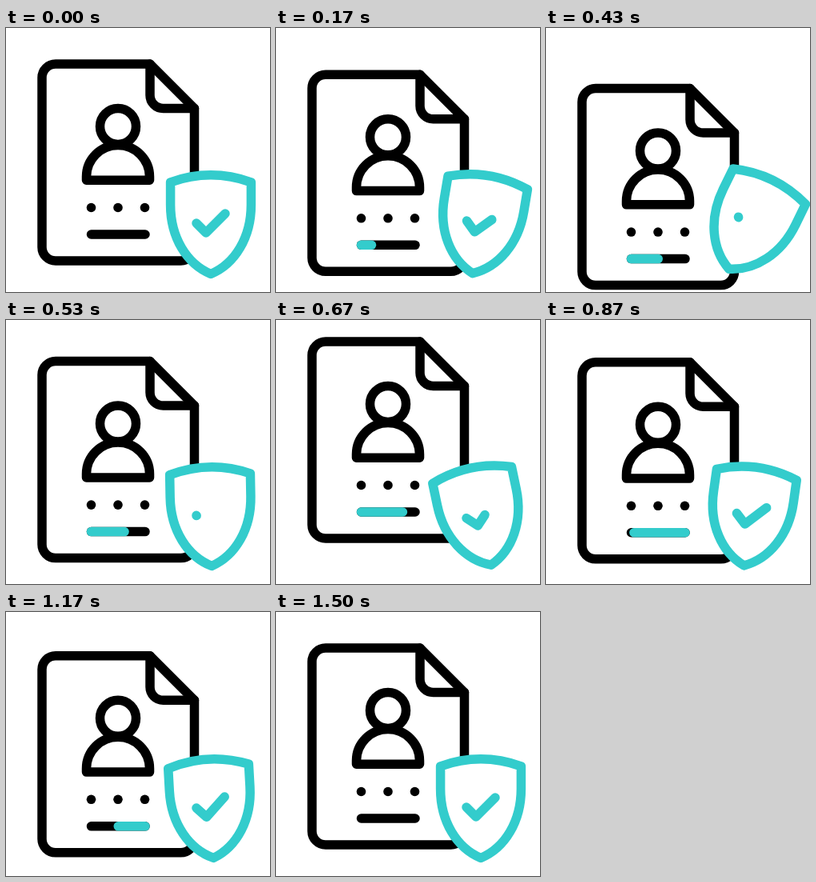
An HTML page with a canvas that plays this animation: 330x330 px, repeating every 1670 ms.

```html
<!DOCTYPE html>
<html lang="en">
<head>
<meta charset="utf-8">
<title>Verified profile</title>
<style>
  html, body { margin: 0; width: 100%; height: 100%; overflow: hidden; background: #fff; }
  canvas { display: block; width: 330px; height: 330px; }
</style>
</head>
<body>
<canvas id="stage" width="330" height="330"></canvas>
<script>
const ctx = document.getElementById('stage').getContext('2d');
const BLACK = '#000', TEAL = '#33cccc';
const LOOP = 1670, FRAME = 100 / 3, LAST = 45;

// Keys are [frame, value] pairs.
const docShift = [[0, 0], [11.7, 34], [20, -18], [30.4, 24], [38.6, 0]];
const shieldTilt = [[0, 0], [12.5, 27], [18.2, -15], [26, 8], [34, -3.4], [41, 0]];
const tickLength = [[0, 1], [15, 0], [24, 1]];

const page = new Path2D('M180 45H62A17 17 0 0 0 45 62V274A17 17 0 0 0 62 291H218.5' +
  'A17 17 0 0 0 235.5 274V100.5ZV84A16.5 16.5 0 0 0 196.5 100.5H235.5');
const fold = new Path2D('M180 45V84A16.5 16.5 0 0 0 196.5 100.5H235.5');
const outline = new Path2D('M180 45H62A17 17 0 0 0 45 62V274A17 17 0 0 0 62 291H218.5' +
  'A17 17 0 0 0 235.5 274V100.5Z');
const person = new Path2D('M162.5 123A22.5 22.5 0 1 1 117.5 123A22.5 22.5 0 1 1 162.5 123Z' +
  'M100.5 190.3V186A39.5 39.5 0 0 1 179.5 186V190.3Z');
const shield = new Path2D('M205.6 192.8Q256 174.8 306.4 192.8V221C306.4 262 286 295 256 307.5' +
  'C226 295 205.6 262 205.6 221Z');
const PIVOT = [256, 245.5];
const TICK = [[238, 244], [250, 256], [274, 232]];

const clamp = x => Math.min(1, Math.max(0, x));
const mix = (a, b, k) => a + (b - a) * k;
const smooth = k => k * k * (3 - 2 * k);
const cubic = k => k < 0.5 ? 4 * k ** 3 : 1 - 4 * (1 - k) ** 3;

function valueAt(keys, frame, ease) {
  for (let i = 1; i < keys.length; i++) {
    const [f0, a] = keys[i - 1], [f1, b] = keys[i];
    if (frame <= f1) return mix(a, b, ease((frame - f0) / (f1 - f0)));
  }
  return keys[keys.length - 1][1];
}

function line(points, color) {
  ctx.strokeStyle = color;
  ctx.beginPath();
  points.forEach(([x, y], i) => i ? ctx.lineTo(x, y) : ctx.moveTo(x, y));
  ctx.stroke();
}

function drawDocument(frame) {
  ctx.save();
  ctx.translate(0, valueAt(docShift, frame, smooth));
  ctx.strokeStyle = ctx.fillStyle = BLACK;
  for (const shape of [outline, fold, person]) ctx.stroke(shape);
  for (const x of [106.5, 140, 173.5]) {
    ctx.beginPath();
    ctx.arc(x, 224.5, 5.8, 0, 2 * Math.PI);
    ctx.fill();
  }
  const bar = k => [mix(106.5, 174, k), 258];
  line([bar(0), bar(1)], BLACK);
  const from = clamp((frame - 25) / 20), to = clamp(frame / 26);
  if (to > from) line([bar(from), bar(to)], TEAL);
  ctx.restore();
}

function drawTick(amount) {
  const [a, b, c] = TICK;
  const first = Math.hypot(b[0] - a[0], b[1] - a[1]);
  const second = Math.hypot(c[0] - b[0], c[1] - b[1]);
  const length = Math.max(0.01, amount * (first + second));
  const along = (p, q, k) => [mix(p[0], q[0], k), mix(p[1], q[1], k)];
  const points = [a, along(a, b, clamp(length / first))];
  if (length > first) points.push(along(b, c, clamp((length - first) / second)));
  line(points, TEAL);
}

function drawShield(frame) {
  ctx.save();
  ctx.translate(...PIVOT);
  ctx.rotate(valueAt(shieldTilt, frame, smooth) * Math.PI / 180);
  ctx.translate(-PIVOT[0], -PIVOT[1]);
  ctx.fillStyle = '#fff';
  ctx.fill(shield);
  ctx.strokeStyle = TEAL;
  ctx.stroke(shield);
  drawTick(valueAt(tickLength, frame, cubic));
  ctx.restore();
}

let start;
function render(now) {
  start ??= now;
  const time = (now - start) % LOOP;
  const frame = Math.min(LAST, Math.floor((time + 3.4) / FRAME));
  ctx.fillStyle = '#fff';
  ctx.fillRect(0, 0, 330, 330);
  ctx.lineWidth = 11.5;
  ctx.lineCap = ctx.lineJoin = 'round';
  drawDocument(frame);
  drawShield(frame);
  requestAnimationFrame(render);
}
requestAnimationFrame(render);
</script>
</body>
</html>
```
